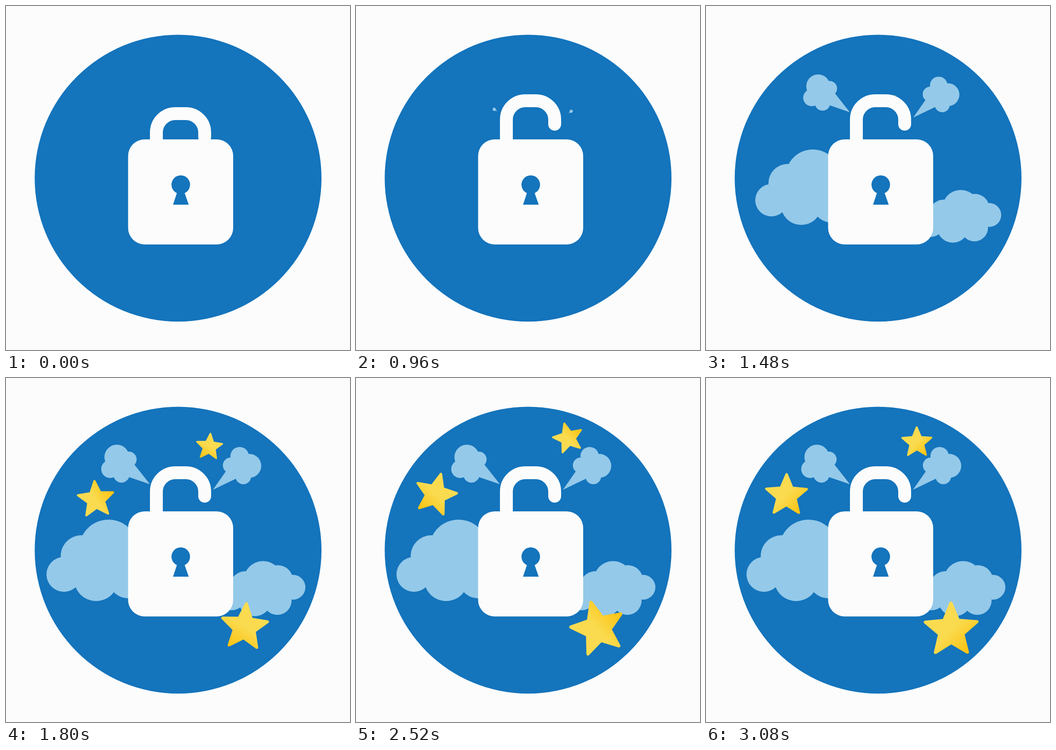
Write an HTML page that moves like this. It is 748 by 748 pixels and loops after 5000 ms.

```html
<!DOCTYPE html>
<html lang="en">
<head>
<meta charset="utf-8">
<title>Unlocking padlock</title>
<style>
  html, body { margin: 0; width: 100%; height: 100%; overflow: hidden; background: #fcfcfc; }
  svg { display: block; width: 100vw; height: 100vh; }
</style>
</head>
<body>
<svg viewBox="0 0 748 748">
  <defs>
    <linearGradient id="gold" gradientUnits="userSpaceOnUse" x1="-42" y1="-42" x2="42" y2="42">
      <stop offset=".48" stop-color="#fadb50"/>
      <stop offset="1" stop-color="#fcc210"/>
    </linearGradient>
  </defs>
  <circle cx="374.2" cy="374.4" r="311.8" fill="#1474bc"/>

  <g fill="#94c9e9">
    <g id="cloudLeft">
      <circle cx="126" cy="427" r="38"/>
      <circle cx="164" cy="387" r="45"/>
      <circle cx="223" cy="372" r="64"/>
      <circle cx="196" cy="437" r="48"/>
      <circle cx="266" cy="435" r="44"/>
      <circle cx="200" cy="410" r="60"/>
      <rect x="225" y="370" width="75" height="70"/>
    </g>
    <g id="cloudRight">
      <circle cx="559" cy="440" r="42"/>
      <circle cx="591" cy="440" r="33"/>
      <circle cx="624" cy="455" r="27"/>
      <circle cx="590" cy="484" r="31"/>
      <circle cx="541" cy="482" r="36"/>
      <circle cx="521" cy="455" r="35"/>
      <circle cx="490" cy="472" r="33"/>
      <ellipse cx="555" cy="465" rx="60" ry="33"/>
    </g>
    <g id="puffLeft">
      <circle cx="241" cy="172" r="27"/>
      <circle cx="267" cy="177" r="17"/>
      <circle cx="226.5" cy="198" r="19.5"/>
      <circle cx="251" cy="210" r="17.5"/>
      <circle cx="250" cy="192" r="21"/>
      <path d="M250 192L279 188L313 231L266 215Z"/>
    </g>
    <g id="puffRight">
      <circle cx="508" cy="170" r="20"/>
      <circle cx="529" cy="191" r="26"/>
      <circle cx="516" cy="214" r="17"/>
      <circle cx="488.5" cy="190" r="17"/>
      <circle cx="506" cy="194" r="19"/>
      <path d="M506 194L478 203L450 243L504 217Z"/>
    </g>
  </g>

  <g id="stars" fill="url(#gold)" stroke="url(#gold)" stroke-width="7" stroke-linejoin="round"></g>

  <path id="shackle" d="M327 330V247a41 41 0 0 1 41 -41H391a41 41 0 0 1 41 41V257"
        fill="none" stroke="#fcfcfc" stroke-width="28" stroke-linecap="round"/>
  <rect x="265.5" y="290" width="228.5" height="228.5" rx="36" fill="#fcfcfc"/>
  <g fill="#1474bc">
    <circle cx="380" cy="388.5" r="20.2"/>
    <path d="M372.5 404H387.5L397.3 432H363.2Z"/>
  </g>
</svg>
<script>
const LOOP = 5000, STEP = 40;
const $ = id => document.getElementById(id);
const mix = (a, b, p) => a + (b - a) * p;

// eased progress from start over the given duration
function ease(t, start, dur) {
  const u = Math.min(1, Math.max(0, (t - start) / dur));
  return u * u * (3 - 2 * u);
}

// shapes that grow around a pivot
const growers = [
  { el: $('cloudLeft'), x: 348, y: 363, start: 846 },
  { el: $('cloudRight'), x: 444, y: 442, start: 816 },
  { el: $('puffLeft'), x: 306.3, y: 228.7, start: 816 },
  { el: $('puffRight'), x: 463.2, y: 232.8, start: 816 }
];

// from/to: pivot path; off: centre relative to the pivot
const stars = [
  { from: [324, 335], to: [175.1, 253.4], off: [-0.1, 2.1], size: 0.78, turn: 360 },
  { from: [391, 224], to: [454.8, 134.1], off: [3.6, 6.3], size: 0.565, turn: -360 },
  { from: [434, 446], to: [527.6, 550.7], off: [5.6, -2], size: 1, turn: -360 }
];

const starPoints = Array.from({ length: 10 }, (_, i) => {
  const a = i * Math.PI / 5, r = i % 2 ? 26.5 : 59;
  return (r * Math.sin(a)).toFixed(2) + ',' + (-r * Math.cos(a)).toFixed(2);
}).join(' ');

for (const s of stars) {
  s.el = document.createElementNS('http://www.w3.org/2000/svg', 'polygon');
  s.el.setAttribute('points', starPoints);
  $('stars').append(s.el);
}

function draw(t) {
  $('shackle').setAttribute('transform', `translate(0 ${28 * (1 - ease(t, 0, 760))})`);

  for (const { el, x, y, start } of growers) {
    const k = ease(t, start, 760);
    el.setAttribute('visibility', k ? 'visible' : 'hidden');
    el.setAttribute('transform', `translate(${x} ${y}) scale(${k}) translate(${-x} ${-y})`);
  }

  const p = ease(t, 1240, 720), spin = 1 - ease(t, 1240, 1880);
  for (const { el, from, to, off, size, turn } of stars) {
    el.setAttribute('visibility', p ? 'visible' : 'hidden');
    el.setAttribute('transform',
      `translate(${mix(from[0], to[0], p)} ${mix(from[1], to[1], p)}) rotate(${turn * spin}) ` +
      `scale(${p}) translate(${off}) scale(${size})`);
  }
}

const begin = performance.now();
function tick() {
  const t = (performance.now() - begin) % LOOP;
  draw(Math.min(3080, Math.floor(t / STEP) * STEP));
  requestAnimationFrame(tick);
}
tick();
</script>
</body>
</html>
```
